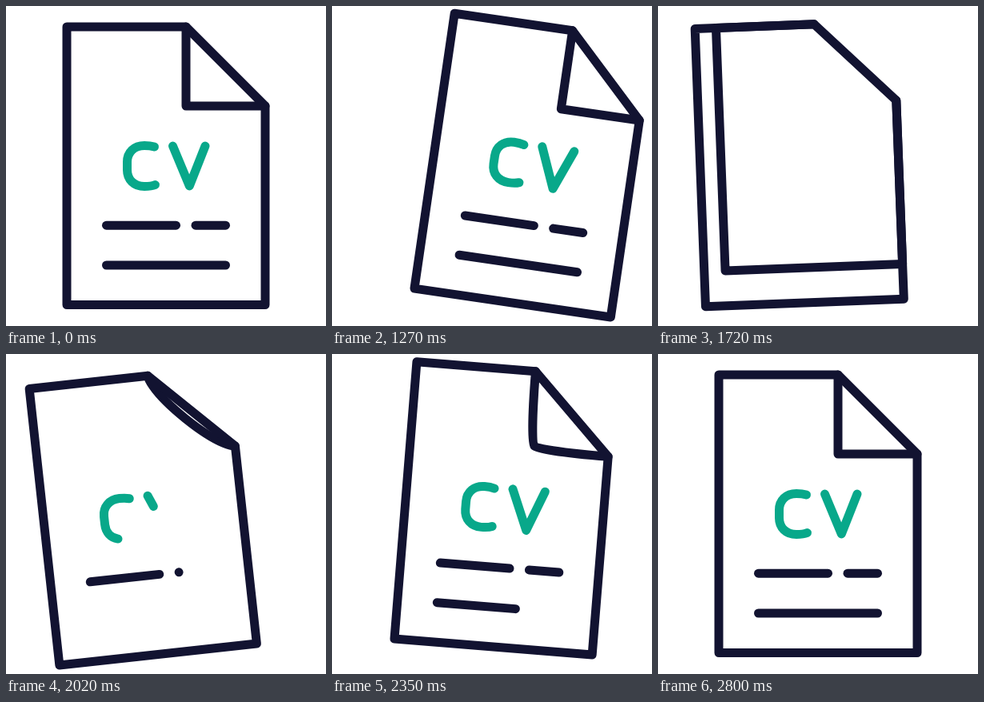
An HTML page that plays this animation: 400x400 px, repeating every 2.83 s.

```html
<!DOCTYPE html>
<html lang="en">
<head>
<meta charset="utf-8">
<title>CV page</title>
<style>
  html, body { margin: 0; width: 100%; height: 100%; overflow: hidden; background: #fff; }
  svg { display: block; width: 100vw; height: 100vh; }
  path { fill: none; stroke: #121331; stroke-width: 11; stroke-linecap: round; stroke-linejoin: round; }
  .letter { stroke: #08a88a; }
  #fold { fill: #fff; }
</style>
</head>
<body>
<svg viewBox="0 0 400 400">
  <g id="page">
    <path class="letter" id="c" pathLength="1" d="M185.5 176C182 175 177 174.5 173 174.5C160 174.5 151.5 183 151.5 195V205C151.5 217 160 225.5 173 225.5C178 225.5 183 225 186.5 223.5"/>
    <path class="letter" id="v" pathLength="1" d="M208.5 175L229.3 225L249 175"/>
    <path id="line" pathLength="1" d="M125.5 274.2H212.5"/>
    <path id="dash" pathLength="1" d="M237 274.2H274.5"/>
    <path id="last" pathLength="1" d="M125.5 324H274.5"/>
    <path id="fold"/>
    <path d="M76 26H225L324 125V373.5H76Z"/>
  </g>
</svg>
<script>
const LOOP = 2830, TURN = 1330, COVERED = 1870;
const $ = id => document.getElementById(id);

// Eased progress from 0 to 1 between two times
const ease = (t, from, to) => {
  const k = Math.min(1, Math.max(0, (t - from) / (to - from)));
  return (1 - Math.cos(Math.PI * k)) / 2;
};

// Value of a track of [time, value] keys, eased between neighbours
const track = (t, keys) => keys.slice(1).reduce((value, [time, next], i) =>
  value + (next - keys[i][1]) * ease(t, keys[i][0], time), keys[0][1]);

const X = [[1000, 0], [TURN, 55], [COVERED, -40], [2380, 16], [2800, 0]];
const Y = [[1000, 0], [TURN, -0.7], [1600, -4.6], [1950, 3.7], [2380, -7], [2800, 0]];
const ANGLE = [[1000, 0], [TURN, 9], [1950, -7], [2380, 4.75], [2800, 0]];

// When each stroke is drawn again on the fresh page
const STROKES = {
  line: [1870, 2018], c: [1870, 2085], v: [1960, 2210], dash: [2020, 2150], last: [2200, 2450]
};

function foldPath(t) {
  if (t < COVERED) {
    const k = ease(t, TURN, COVERED);
    const x = 225 - 149 * k, y = 125 + 248.5 * k;
    return `M225 26H${x}V${y}H324V125`;
  }
  // The new corner peels off the crease and sharpens
  const p = ease(t, 1840, 2500), q = 49.5 * (1 - p);
  const x = 225 + q, y = 125 - q;
  return `M225 26C225 26 225 ${y - q} ${x} ${y}C${x + q} 125 324 125 324 125`;
}

function draw(t) {
  $('page').setAttribute('transform',
    `translate(${track(t, X)} ${track(t, Y)}) rotate(${track(t, ANGLE)} 200 199.75)`);
  $('fold').setAttribute('d', foldPath(t));
  for (const [id, [from, to]] of Object.entries(STROKES)) {
    const shown = t < COVERED ? 1 : ease(t, from, to);
    $(id).style.visibility = shown > 0 ? 'visible' : 'hidden';
    $(id).style.strokeDasharray = shown < 1 ? `${shown} 2` : 'none';
  }
}

const start = performance.now();
function tick() {
  draw((performance.now() - start) % LOOP);
  requestAnimationFrame(tick);
}
tick();
</script>
</body>
</html>
```
